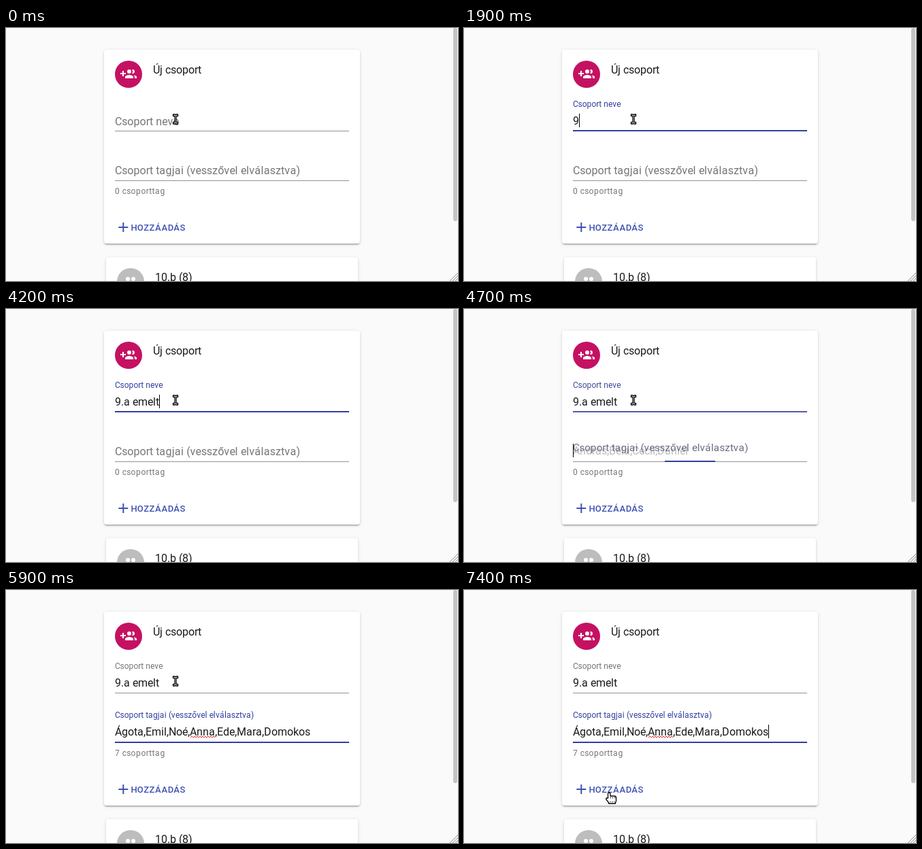
Recreate the animation shown at these times as an HTML page. Size 664 by 372 pixels, loop 8000 ms.

```html
<!DOCTYPE html>
<html lang="hu">
<head>
<meta charset="utf-8">
<title>Új csoport</title>
<style>
  html, body { margin: 0; width: 100%; height: 100%; overflow: hidden; background: #fafafa; }
  #stage { position: relative; width: 664px; height: 372px; overflow: hidden; }
  .card {
    position: absolute; background: #fff; border-radius: 4px;
    box-shadow: 0 3px 1px -2px rgba(0,0,0,.2), 0 2px 2px rgba(0,0,0,.14), 0 1px 5px rgba(0,0,0,.12);
  }
  svg { position: absolute; left: 0; top: 0; display: block; }
  text { font-family: Roboto, sans-serif; fill: #1a1a1a; white-space: pre; }
  .hint { fill: #a0a0a0; }
  .helper { fill: #757575; }
  .button { fill: #3f51b5; }
  .cursor path { fill: #fff; stroke: #000; stroke-width: 1.3; stroke-linejoin: round; }
</style>
</head>
<body>
<div id="stage">
<div class="card" style="left:144px;top:32px;width:376px;height:285px"></div>
<div class="card" style="left:147px;top:337px;width:370px;height:60px"></div>
<svg width="664" height="372" viewBox="0 0 664 372">
  <circle cx="180" cy="68" r="20" fill="#c51162"/>
  <path transform="translate(168 56)" fill="#fff" d="M8 10H5V7H3v3H0v2h3v3h2v-3h3zM18 11a3 3 0 0 0 0-6q-.5 0-.9.14a5 5 0 0 1 0 5.72q.4.14.9.14zM13 11a3 3 0 0 0 0-6 3 3 0 0 0 0 6zM19.62 13.16c.83.73 1.38 1.66 1.38 2.84v2h3v-2c0-1.54-2.37-2.49-4.38-2.84zM13 13c-2 0-6 1-6 3v2h12v-2c0-2-4-3-6-3z"/>
  <path d="M165.300 293h14M172.300 286v14" stroke="#3f51b5" stroke-width="2"/>
  <circle cx="183" cy="373" r="20" fill="#bdbdbd"/>
  <circle cx="179" cy="369" r="3" fill="#fff"/>
  <circle cx="187" cy="369" r="3" fill="#fff"/>

  <g id="texts"></g>
  <path id="squiggle" fill="none" stroke="#e02020"/>

  <rect x="657" width="6" height="284" rx="3" fill="#c4c4c4"/>
  <path d="M652 372l12-12M656 372l8-8M660 372l4-4" stroke="#8c8c8c"/>

  <g id="cursor" class="cursor">
    <path id="beam" d="M-3.500-7h2.500l1 .8 1-.8h2.500v2.500H1v9h2.500V7H1L0 6.200-1 7h-2.500V4.500H-1v-9h-2.500z"/>
    <path id="arrow" d="M0 0v15l3.500-3.300 2.400 5.500 2.600-1.100-2.400-5.400h4.700z"/>
    <g id="hand">
      <path d="M-2.500 8V1.500q0-1.500 1.700-1.500T1 1.500V5h6q2.500 0 2.500 2.500V12q0 1.500-1 2.500V16h-10v-1.500L-5 10.200q-1-2 .8-2.200z"/>
      <path d="M1 7.500h7M.5 13.500h7" fill="none" stroke-dasharray="1 2"/>
    </g>
  </g>
</svg>
</div>
<script>
const LOOP = 8000, STEP = 100, LEFT = 160, WIDTH = 344;
const NAME = '9.a emelt', MEMBERS = 'Ágota,Emil,Noé,Anna,Ede,Mara,Domokos';
const GREY = [117, 117, 117], INDIGO = [63, 81, 181], DARK = [48, 63, 159];
const $ = id => document.getElementById(id);
const pen = document.createElement('canvas').getContext('2d');

function set(el, attrs) {
  for (const key in attrs) el.setAttribute(key, attrs[key]);
}
function add(tag, attrs) {
  const el = document.createElementNS('http://www.w3.org/2000/svg', tag);
  set(el, attrs);
  return $('texts').appendChild(el);
}

// Text on a whole-pixel glyph grid, as a hinted renderer sets it.
function makeText(x, y, { size = 16, weight = 400, spacing = 0, kind = '' } = {}) {
  const el = add('text', { y, class: kind, 'font-size': size, 'font-weight': weight });
  const line = { el, end: x, write };
  function write(text) {
    pen.font = `${weight} ${size}px Roboto, sans-serif`;
    line.end = x;
    const xs = [...text].map(ch => {
      const at = line.end;
      line.end += Math.round(pen.measureText(ch).width) + spacing;
      return at;
    });
    set(el, { x: xs.join(' ') });
    el.textContent = text;
    return line;
  }
  return line;
}

const clamp = u => Math.max(0, Math.min(1, u));
const mix = (a, b, u) => a + (b - a) * u;
const mixColor = (a, b, u) => `rgb(${a.map((v, i) => Math.round(mix(v, b[i], u)))})`;
const show = (el, on) => set(el, { visibility: on ? 'visible' : 'hidden' });
// Focus transition: already slightly under way at its first step.
const focusEase = (t, start) => t < start ? 0 : 1 - (1 - clamp((t - start + 14) / 180)) ** 3;
const easeInOut = u => u * u * (3 - 2 * u);

// Last value of the [time, value] pairs that has begun.
const latest = (track, t) => track.reduce((v, [at, next]) => t >= at ? next : v, track[0][1]);

const typed = [0, 1900, 2100, 3000, 3400, 3600, 3700, 3800, 4000, 4200]
  .map((at, i) => [at, NAME.slice(0, i)]);

function makeField(opts) {
  const { base, lineY, label, hint } = opts;
  return {
    ...opts,
    rule: add('rect', { x: LEFT, y: lineY, width: WIDTH, height: 1, fill: '#949494' }),
    ripple: add('rect', { y: lineY - 1, height: 2, fill: '#303f9f' }),
    hintEl: makeText(LEFT, base, { kind: 'hint' }).write(hint).el,
    labelEl: makeText(0, 0, { spacing: .15 }).write(label).el,
    input: makeText(LEFT, base),
    caret: add('rect', { y: base - 16, width: 1, height: 20, fill: '#000' })
  };
}

makeText(216, 67).write('Új csoport');
makeText(219, 372).write('10.b (8)');
makeText(183.4, 298, { size: 13, weight: 500, spacing: .4, kind: 'button' }).write('HOZZÁADÁS');
const count = makeText(LEFT, 244, { size: 12, spacing: .4, kind: 'helper' });

const fields = [
  makeField({
    base: 142, lineY: 151, rest: 143, up: 116, label: 'Csoport neve', hint: 'pl. 9.c emelt',
    focus: 1200, settle: 1800, blur: 4700, text: typed,
    blink: [[0, false], [1200, true], [1800, false], [1900, true], [2700, false], [3000, true], [4700, false]]
  }),
  makeField({
    base: 214, lineY: 224, rest: 215, up: 188, label: 'Csoport tagjai (vesszővel elválasztva)',
    hint: 'András,Béla,Cecil,Dániel',
    focus: 4700, settle: 5300, blur: Infinity, text: [[0, ''], [5500, MEMBERS]],
    blink: [[0, false], [4700, true], [5300, false], [5500, true], [5900, false],
      [6300, true], [6700, false], [7100, true]]
  })
];

set($('squiggle'), { d: 'M271 217' + 'l2-2 2 2'.repeat(9) });

function drawField(f, t) {
  const p = focusEase(t, f.focus), out = focusEase(t, f.blur);
  const text = latest(f.text, t);
  const y = mix(f.rest, f.up + (t < f.settle ? .5 : 0), p);
  const active = t < f.settle ? INDIGO : DARK;
  set(f.labelEl, {
    transform: `translate(${LEFT} ${y}) scale(${1 - .25 * p})`,
    style: `fill:${mixColor(GREY, active, p * (1 - out))}`
  });
  set(f.ripple, { x: LEFT + WIDTH * (1 - p) / 2, width: WIDTH * p, opacity: 1 - out });
  f.input.write(text);
  show(f.hintEl, p > 0 && !text);
  set(f.hintEl, { opacity: clamp(.6 + p / 2) });
  show(f.caret, latest(f.blink, t));
  set(f.caret, { x: f.input.end });
}

function drawCursor(t) {
  const go = easeInOut(clamp((t - 5900) / 800));
  const x = Math.round(mix(249, 214, go));
  const y = Math.round(mix(134, 290, go) + 7 * clamp((t - 6700) / 400)) + (t >= 7400 ? 1 : 0);
  const overField = y < 152 || (y >= 168 && y < 225), overButton = y >= 276;
  set($('cursor'), { transform: `translate(${x} ${y})` });
  show($('beam'), overField);
  show($('hand'), overButton);
  show($('arrow'), !overField && !overButton);
}

function draw(now) {
  const t = Math.floor(now % LOOP / STEP) * STEP;
  fields.forEach(f => drawField(f, t));
  count.write(`${t < 5500 ? 0 : MEMBERS.split(',').length} csoporttag`);
  show($('squiggle'), t >= 5500);
  drawCursor(t);
}

const start = performance.now();
function tick() {
  draw(performance.now() - start);
  requestAnimationFrame(tick);
}
tick();
</script>
</body>
</html>
```
